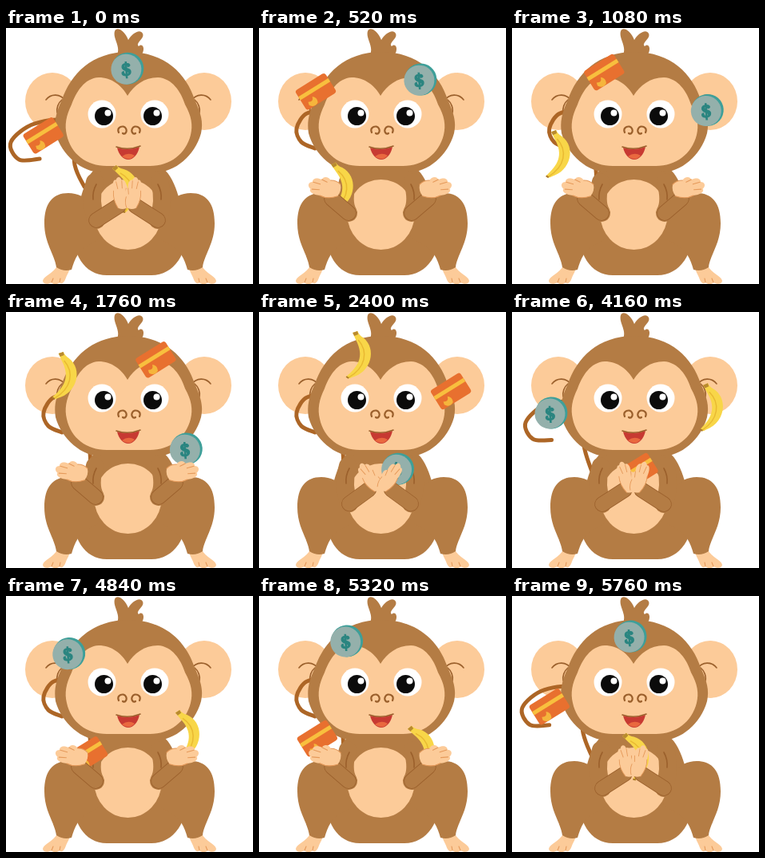
Animation of 309 by 321 pixels, one loop 5800 ms. Source, as an HTML page:

```html
<!DOCTYPE html>
<html lang="en">
<head>
<meta charset="utf-8">
<title>Juggling monkey</title>
<style>
  html, body { margin: 0; width: 100%; height: 100%; overflow: hidden; background: #fff; }
  svg { display: block; width: 309px; height: 321px; }
  .fur { fill: #b47c44; }
  .skin { fill: #fccb99; }
  .line { fill: none; stroke: #9b602c; stroke-width: 1.6; stroke-linecap: round; }
  .thick { stroke-width: 2.2; }
  .crease { fill: none; stroke: #e59a5b; stroke-width: 1.1; stroke-linecap: round; }
  .limb { fill: none; stroke: #b47c44; stroke-width: 18; stroke-linecap: round; }
  .edge { stroke: #9b602c; stroke-width: 19.6; }
  .upper { stroke-width: 22; }
  #tail { fill: none; stroke: #ad6626; stroke-width: 5; stroke-linecap: round; }
  #coin text { font: bold 24px "Noto Serif", "DejaVu Serif", serif; text-anchor: middle; fill: #2a8580; stroke: #2a8580; stroke-width: 1.2; }
</style>
</head>
<body>
<svg viewBox="0 0 309 321">
  <defs>
    <g id="ear">
      <ellipse class="skin" cx="58" cy="92" rx="34" ry="36"/>
      <path class="line" d="M50 90C56 82 68 82 74 91M70 90C65 94 63 101 64 106"/>
    </g>
    <g id="leg">
      <path class="skin" d="M64 298L80 300C79 306 77 308 75 313C73 319 70 322 67 319C63 323 58 321 57 319C52 322 46 321 46 317C47 311 60 307 64 298Z"/>
      <path class="fur" d="M48 245C48 220 58 207 78 207C101 207 116 226 120 262C106 272 94 276 90 284C86 290 84 296 82 303Q72 306 63 300C61 284 48 270 48 245Z"/>
      <path class="crease" d="M57 319L59 314M67 319L68 314"/>
    </g>
    <g id="hand">
      <path class="skin" d="M-8 17C-13 8 -13 1 -11 -5C-12 -13 -9 -20 -5 -18C-2 -23 3 -22 4 -17C9 -18 11 -12 9 -6C14 -5 14 2 10 5C11 10 10 14 7 18Q0 21 -8 17Z"/>
      <path class="crease" d="M-5 -16L-4 -7M4 -16L3 -7M9 -6L7 1M-8 17C-13 8 -13 1 -11 -5M10 5C11 10 10 14 7 18"/>
    </g>
    <g id="eye">
      <circle r="17.500" fill="#fff"/>
    </g>
    <g id="pupil">
      <circle r="11.500" fill="#0b0b0b"/>
      <circle cx="5" cy="-4" r="4" fill="#fff"/>
    </g>
    <path id="nostril" class="line thick" d="M141 131C138 124 147 121 150 126C152 130 149 134 146 132"/>
  </defs>

  <use href="#ear"/>
  <use href="#ear" transform="matrix(-1 0 0 1 306 0)"/>
  <path id="tail"/>

  <path class="fur" d="M122 171C102 176 94 205 86 246C80 282 98 310 126 310H182C210 310 230 282 224 246C216 205 207 176 186 171Z"/>
  <use href="#leg"/>
  <use href="#leg" transform="matrix(-1 0 0 1 309 0)"/>
  <ellipse class="skin" cx="152.500" cy="234" rx="42" ry="44"/>
  <g id="shoulders"></g>

  <path class="fur" d="M137 36C146 25 133 14 136 4C138 -2 148 2 153 15C157 7 168 0 171 7C174 13 161 19 166 23C170 19 174 24 171 31L166 38Z"/>
  <path class="fur" d="M153 30C199 30 226 58 236 90C244 107 247 118 244 132C236 160 212 181 186 181H120C95 181 70 160 62 132C60 118 62 107 70 90C81 58 107 30 153 30Z"/>
  <path class="skin" d="M152 85C160 72 173 62 190 62C208 63 219 80 224 96C232 110 234 122 231 134C225 158 205 173 180 173H126C101 173 81 158 76 134C73 122 75 110 82 96C88 80 98 63 116 62C132 62 145 72 152 85Z"/>
  <use href="#eye" x="120" y="108"/>
  <use href="#eye" x="186" y="108"/>
  <use href="#pupil" x="122.500" y="110.500"/>
  <use href="#pupil" x="183.500" y="110.500"/>
  <use href="#nostril"/>
  <use href="#nostril" transform="matrix(-1 0 0 1 308 0)"/>
  <path d="M139 150Q153 154 167 149C165 159 159 165 153 165C147 165 141 159 139 150Z" fill="#c73a32"/>
  <path d="M145 161Q153 155 161 160Q154 168 145 161Z" fill="#e9683f"/>
  <path class="line" d="M138 149Q153 154 168 148"/>

  <g id="card">
    <rect x="-22" y="-14.500" width="44" height="29" rx="3.500" fill="#e8702f"/>
    <rect x="-22" y="-6" width="44" height="5" fill="#f8bf3e"/>
    <path d="M-15 6Q-9 10 -7 3Q-2 7 -5 13Q-12 17 -16 10Z" fill="#f5b53c"/>
  </g>
  <g id="banana">
    <path d="M-5 -28L1 -30Q3 -25 8 -22C26 -8 18 22 -6 28Q-11 31 -13 27C2 14 10 2 -1 -19Z" fill="#f8d648"/>
    <path d="M2 -19C15 -4 11 16 -10 28" fill="none" stroke="#e9b932" stroke-width="1.500"/>
    <path d="M-5 -28L1 -30L2 -26L-3 -24Z" fill="#b98a2f"/>
    <path d="M-13 27L-10 29" stroke="#a9772c" stroke-width="2"/>
  </g>
  <g id="coin">
    <circle cx="2" cy="-1" r="20" fill="#3e9f99"/>
    <circle r="19" fill="#94b0ab"/>
    <text y="9">$</text>
  </g>

  <g id="arms"></g>
</svg>

<script>
const LOOP = 5800;
const $ = id => document.getElementById(id);
const mix = (a, b, k) => a + (b - a) * k;
const mixPoint = (p, q, k) => p.map((v, i) => mix(v, q[i], k));
const clamp = k => Math.min(1, Math.max(0, k));
const smooth = k => k * k * (3 - 2 * k);
const bump = (x, width) => Math.exp(-((x / width) ** 2));
const wrap = t => ((t % LOOP) + LOOP) % LOOP;

// Every toy travels this closed route, evenly timed, each with its own delay.
const route = [
  [163, 53], [214, 74], [246, 114], [227, 168], [195, 193],
  [125, 201], [86, 190], [47, 140], [70, 81], [110, 57]
];
const delays = { coin: 0, card: 1550, banana: 2960 };
const CLASP = 2720, CATCH = 4120; // lap times in both hands and at the tail

function routePoint(lap) {
  const n = route.length, pos = lap / LOOP * n;
  const i = Math.floor(pos), u = pos - i;
  const [a, b, c, d] = [-1, 0, 1, 2].map(k => route[(i + k + n) % n]);
  return b.map((v, j) => v + u / 2 * (c[j] - a[j]
    + u * (2 * a[j] - 5 * v + 4 * c[j] - d[j] + u * (3 * (v - c[j]) + d[j] - a[j]))));
}

// The whole act speeds up and slows down gently once per loop.
const pace = t => t + 138 * Math.sin((t - 1400) / LOOP * 2 * Math.PI);

function curve(pts) {
  let d = `M${pts[0]}`;
  for (let i = 0; i < pts.length - 1; i++) {
    const b = pts[i], c = pts[i + 1], a = pts[i - 1] || b, e = pts[i + 2] || c;
    const p = b.map((v, k) => v + (c[k] - a[k]) / 6);
    const q = c.map((v, k) => v - (e[k] - b[k]) / 6);
    d += `C${p} ${q} ${c}`;
  }
  return d;
}

const tailRest = [[104, 199], [104, 172], [82, 112], [60, 107], [47, 126], [53, 143], [70, 151]];
const tailReach = [[98, 199], [86, 172], [80, 120], [36, 120], [6, 143], [16, 165], [42, 164]];

function drawTail(reach) {
  $('tail').setAttribute('d', curve(tailRest.map((p, i) => mixPoint(p, tailReach[i], reach))));
}

const mirror = '<g transform="matrix(-1 0 0 1 303 0)">';
const bothSides = (id, part) => {
  $(id).innerHTML = `<g>${part}</g>${mirror}${part}</g>`;
  return [...$(id).children];
};
const shoulders = bothSides('shoulders',
  '<path class="limb upper"/><path class="line" d="M113 196Q108 205 109 215"/>');
const arms = bothSides('arms', '<path class="limb edge"/><path class="limb"/><use href="#hand"/>');

// k: 0 with the hands clasped, 1 with the hands on the knees.
function drawArms(k) {
  const s = smooth(k * k);
  const elbow = mixPoint([113, 241], [112, 232], s);
  const wrist = mixPoint([141, 223], [91, 214], s);
  const palm = mixPoint([144, 208], [83, 200], s);
  const hand = `translate(${palm}) rotate(${mix(-6, -80, k)}) scale(${mix(.8, 1, s)} 1)`;
  for (const side of shoulders) {
    side.children[0].setAttribute('d', `M111 193Q104 218 ${elbow}`);
  }
  for (const side of arms) {
    const [edge, fur, fist] = side.children;
    for (const part of [edge, fur]) part.setAttribute('d', `M${elbow}L${wrist}`);
    fist.setAttribute('transform', hand);
  }
}

const turns = {
  coin: () => -4,
  card: () => -32,
  banana: lap => -24 * bump(lap - 2400, 900)
};

function draw(t) {
  const laps = [];
  for (const id in delays) {
    const lap = wrap(pace(t) - delays[id]);
    laps.push(lap);
    $(id).setAttribute('transform', `translate(${routePoint(lap)}) rotate(${turns[id](lap)})`);
  }
  const nearest = spot => Math.min(...laps.map(lap => Math.abs(lap - spot)));
  drawArms(clamp(nearest(CLASP) / 490));
  drawTail(bump(nearest(CATCH), 110));
}

const start = performance.now();
function tick() {
  draw((performance.now() - start) % LOOP);
  requestAnimationFrame(tick);
}
tick();
</script>
</body>
</html>
```
